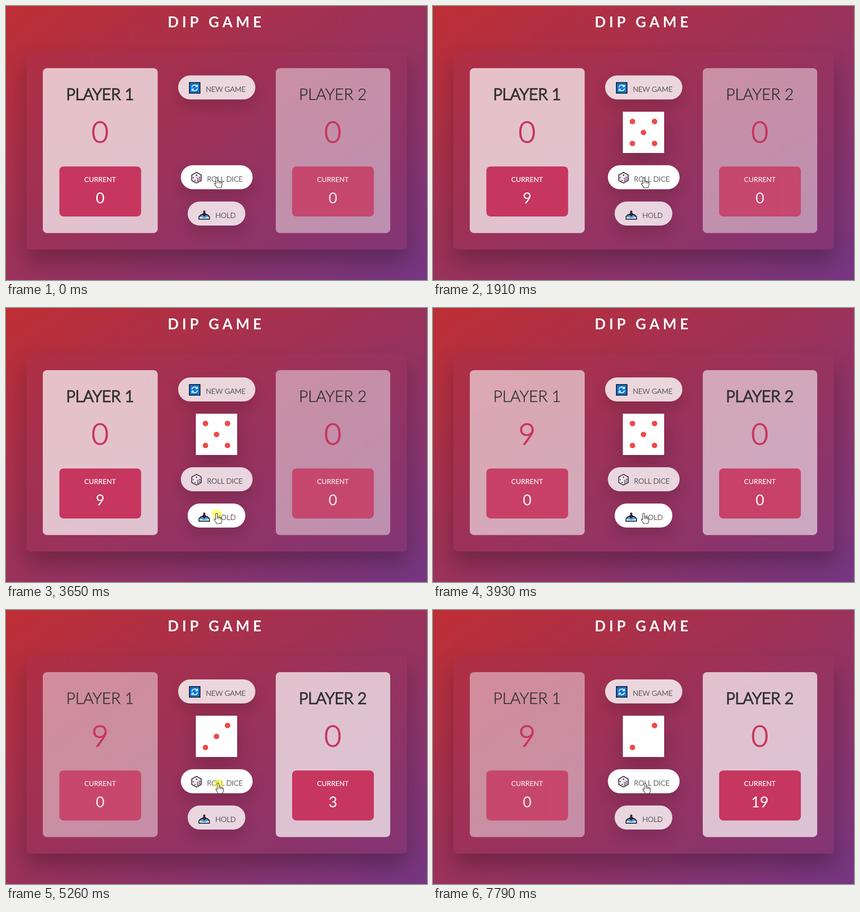
Animation, 927 px wide and 604 px high, one loop 8 s. Source, as an HTML page:

```html
<!DOCTYPE html>
<html lang="en">
<head>
<meta charset="utf-8">
<title>Dice game</title>
<style>
  html, body { margin: 0; width: 100%; height: 100%; overflow: hidden; }
  body { position: relative; background: linear-gradient(to top left, #753682, #bf2e34); }
  div, svg { position: absolute; }
  svg { left: 0; top: 0; }
  .card {
    left: 44.5px; top: 101px; width: 838px; height: 436px; border-radius: 9px;
    background: linear-gradient(to top left, #7e3679, #b62e3d) -44.5px -101px / 927px 604px;
    box-shadow: 0 27px 45px rgba(0, 0, 0, .25);
  }
  .btn {
    height: 53px; border-radius: 27px; background: rgba(255, 255, 255, .8);
    box-shadow: 0 16px 32px rgba(0, 0, 0, .14);
  }
  #new { left: 379px; top: 153px; width: 170px; }
  #roll { left: 384.5px; top: 351px; width: 158px; }
  #hold { left: 400px; top: 431px; width: 127px; }
  #die {
    left: 418px; top: 233px; width: 91px; height: 91px; background: #fff;
    box-shadow: 0 18px 45px rgba(0, 0, 0, .2);
  }
  text { font-family: Lato, "Open Sans", sans-serif; font-weight: 300; }
  .title { font-size: 32px; font-weight: 700; letter-spacing: 7.4px; fill: #fff; }
  .caption { font-size: 16px; fill: #333; stroke: #333; stroke-width: .3; }
  .player text { text-anchor: middle; }
  .player .name { font-size: 35px; letter-spacing: -.2px; fill: #333; stroke: #333; }
  .player .score { font-size: 65px; fill: #c7365f; stroke: #c7365f; stroke-width: 1.6; }
  .current text { fill: #fff; font-weight: 400; }
  .label { font-size: 15.2px; stroke: #fff; stroke-width: .2; }
  .points { font-size: 33px; }
</style>
</head>
<body>
<div class="card"></div>
<div class="btn" id="new"></div>
<div id="die"></div>
<div class="btn" id="roll"></div>
<div class="btn" id="hold"></div>

<svg width="927" height="604" viewBox="0 0 927 604">
  <text class="title" x="356" y="46.5">DIP GAME</text>
  <g id="players"></g>
  <g id="pips" fill="#ec4b4b"></g>

  <text class="caption" x="440" y="188.5">NEW GAME</text>
  <text class="caption" x="442.5" y="386.5">ROLL DICE</text>
  <text class="caption" x="461" y="466.5">HOLD</text>

  <!-- refresh -->
  <g transform="translate(415.5 180.5)">
    <rect x="-11.7" y="-11.7" width="23.4" height="23.4" fill="#0f78d6" stroke="#111" stroke-width="1.8"/>
    <g fill="none" stroke="#fff" stroke-width="1.8">
      <path d="M-6.2-1A6.3 6.3 0 0 1 5.4-3.2M6-7v4.3h-4.3"/>
      <path d="M6.2 1A6.3 6.3 0 0 1-5.4 3.2M-6 7v-4.3h4.3"/>
    </g>
  </g>

  <!-- small die -->
  <g transform="translate(419.5 378.5)">
    <path d="M0-11.8L10.4-6V6.2L0 11.8L-10.4 6.2V-6Z" fill="#f8eff6" stroke="#1a1420" stroke-width="1.7" stroke-linejoin="round"/>
    <path d="M0 0L9.6-5.2V5.8L0 10.9Z" fill="#e2c6da"/>
    <path d="M-9.6-5.2L0 0L9.6-5.2M0 0V11" fill="none" stroke="#cdb6c8" stroke-width=".7"/>
    <g fill="#2a1a2c">
      <ellipse cy="-5.5" rx="1.9" ry="1.2"/>
      <circle cx="-7" cy="0" r="1.2"/><circle cx="-3.2" cy="6" r="1.2"/>
      <circle cx="3" cy="2.6" r="1.2"/><circle cx="7" cy="0" r="1.2"/>
      <circle cx="3" cy="7" r="1.2"/><circle cx="7" cy="4.6" r="1.2"/>
    </g>
  </g>

  <!-- tray -->
  <g transform="translate(436.5 461)" stroke="#111" stroke-linejoin="round">
    <path d="M-7-1H7L11.6 3.5V9H-11.6V3.5Z" fill="#4a9be0" stroke-width="1.8"/>
    <path d="M-10.8 4H-5L-3 6H3L5 4H10.8V8.2H-10.8Z" fill="#c3dcf2" stroke="none"/>
    <path d="M-1.4-9H1.4V-3H4L0 2L-4-3H-1.4Z" fill="#8a1c34" stroke-width="1.5"/>
  </g>

  <g id="cursor">
    <circle id="click" r="11" cy="1" fill="#ff0" fill-opacity=".5"/>
    <g transform="translate(-.8 0)" stroke="#26222c" stroke-width="1.1" stroke-linejoin="round">
      <path d="M-2 1a2 2 0 0 1 4 0v7c0-2 3.5-2 3.5 0v1c0-1.8 3.3-1.6 3.3 .2v1c.2-1.6 2.7-1.4 2.7 .6v4c0 4-2 5-2.5 7h-8.5c-.5-2-4-5-5.5-8.5c-.8-2 1.6-2.6 3-.3z" fill="#fff"/>
      <path d="M2 8v3.5M5.5 9v3M8.8 10.2v2.5"/>
    </g>
  </g>
</svg>

<script>
const LOOP = 8000, SWITCH = 3720;
const $ = id => document.getElementById(id);

// time, player, face, turn total
const rolls = [
  [360, 0, 2, 2], [1170, 0, 2, 4], [1910, 0, 5, 9],
  [4550, 1, 3, 3], [5330, 1, 3, 6], [6140, 1, 6, 12], [7010, 1, 5, 17], [7790, 1, 2, 19]
];
const clicks = [
  [300, 390], [1100, 1170], [1810, 1910], [SWITCH - 70, SWITCH], [4480, 4550],
  [5260, 5330], [6070, 6140], [6910, 7010], [7720, 7790]
];
// pip cells 0-8, row by row
const faces = { 2: [2, 6], 3: [2, 4, 6], 5: [0, 2, 4, 6, 8], 6: [0, 2, 3, 5, 6, 8] };

$('players').innerHTML = [[81, 253], [594, 252]].map(([x, width], i) => {
  const mid = x + width / 2;
  return `<g class="player">
    <rect class="panel" x="${x}" y="137" width="${width}" height="363.5" rx="9" fill="#fff"/>
    <text class="name" x="${mid - .5}" y="207">PLAYER ${i + 1}</text>
    <text class="score" x="${mid - .3}" y="300.7"></text>
    <g class="current">
      <rect x="${mid - 90}" y="353.7" width="180" height="110.3" rx="9" fill="#c7365f"/>
      <text class="label" x="${mid - .3}" y="387.5">CURRENT</text>
      <text class="points" x="${mid - .3}" y="434.5"></text>
    </g></g>`;
}).join('');

const players = [...document.querySelectorAll('.player')].map(g => {
  const part = name => g.querySelector('.' + name);
  return { panel: part('panel'), name: part('name'), score: part('score'), current: part('current'), points: part('points') };
});

const clamp = v => Math.min(1, Math.max(0, v));
const span = (t, from, length) => clamp((t - from) / length);
const smooth = p => p * p * (3 - 2 * p);
const mix = (a, b, p) => a + (b - a) * p;

// cubic-bezier(.25, .1, .25, 1)
function ease(p) {
  let lo = 0, hi = 1, s = .5;
  for (let i = 0; i < 20; i++) {
    const x = .75 * s * (1 - s) + s ** 3;
    if (x < p) lo = s; else hi = s;
    s = (lo + hi) / 2;
  }
  return .3 * s * (1 - s) ** 2 + 3 * s * s * (1 - s) + s ** 3;
}

function cursorAt(t) {
  if (t < 3210) return [465, 379];
  const down = smooth(span(t, 3200, 400)), up = smooth(span(t, 4000, 380));
  return [mix(mix(464, 464.5, down), 468, up), mix(mix(380.5, 453.5, down), 383, up)];
}

const setText = (el, value) => { if (el.textContent !== String(value)) el.textContent = value; };
const setHover = (id, p) => { $(id).style.backgroundColor = `rgba(255,255,255,${mix(.8, 1, p)})`; };

let shownFace;
function showDie(face) {
  if (face === shownFace) return;
  shownFace = face;
  $('die').style.visibility = face ? 'visible' : 'hidden';
  $('pips').innerHTML = (faces[face] || []).map(c =>
    `<circle cx="${439.2 + c % 3 * 24.3}" cy="${254.6 + Math.floor(c / 3) * 24.2}" r="6.1"/>`).join('');
}

function draw(t) {
  const turn = t < SWITCH ? 0 : 1;
  const last = rolls.filter(r => r[0] <= t).pop();
  const swap = ease(span(t, SWITCH, 750));

  players.forEach((p, i) => {
    const lit = i ? swap : 1 - swap;
    p.panel.style.fillOpacity = mix(.45, .7, lit);
    p.current.style.opacity = mix(.8, 1, lit);
    p.name.style.strokeWidth = i === turn ? 2 : .6;
    setText(p.score, !i && turn ? 9 : 0);
    setText(p.points, last && last[1] === i && i === turn ? last[3] : 0);
  });
  showDie(last ? last[2] : 0);

  setHover('roll', 1 - ease(span(t, 3356, 200)) + ease(span(t, 4230, 200)));
  setHover('hold', ease(span(t, 3452, 200)) - ease(span(t, 4144, 200)));

  const [x, y] = cursorAt(t);
  $('cursor').setAttribute('transform', `translate(${x} ${y})`);
  $('click').style.visibility = clicks.some(([on, off]) => t >= on && t < off) ? 'visible' : 'hidden';
}

const start = performance.now();
function tick() {
  draw((performance.now() - start) % LOOP);
  requestAnimationFrame(tick);
}
tick();
</script>
</body>
</html>
```
